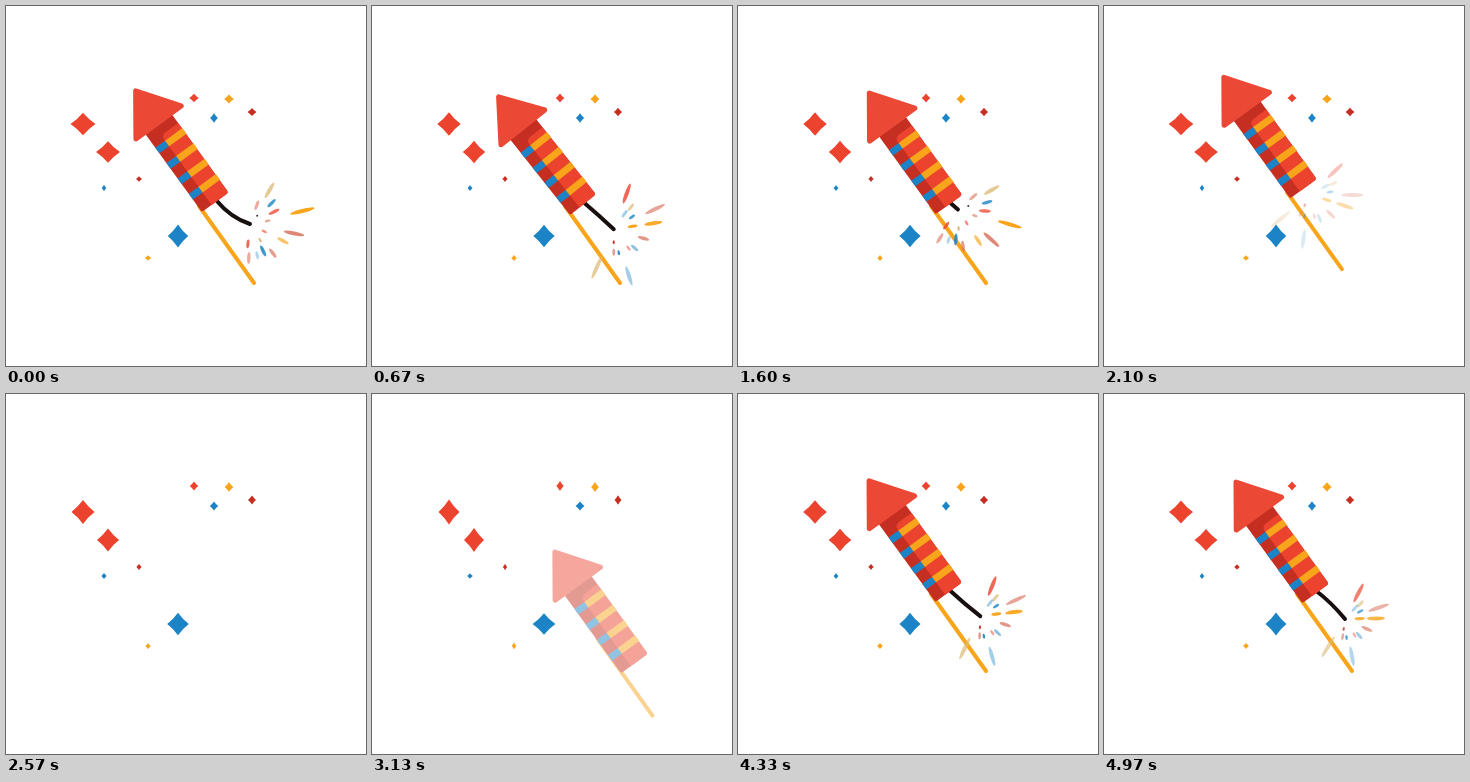
Animation of 360 by 360 pixels, one loop 5070 ms. Source, as an HTML page with a canvas:

```html
<!DOCTYPE html>
<html lang="en">
<head>
<meta charset="utf-8">
<title>Firework rocket</title>
<style>
html, body { margin: 0; width: 100%; height: 100%; overflow: hidden; background: #fff; }
canvas { display: block; width: 100vw; height: 100vh; }
</style>
</head>
<body>
<canvas id="stage" width="360" height="360"></canvas>
<script>
const LOOP = 5070, SIZE = 360;
const stage = document.getElementById('stage').getContext('2d');
const layer = document.createElement('canvas');
layer.width = layer.height = SIZE;
const ctx = layer.getContext('2d');

const RED = '#ec432e', DARK = '#c52f22', ORANGE = '#f8a51c', BLUE = '#1c84c6';
const TAN = '#dcb873', SALMON = '#d8745f', INK = '#17100f';
const rad = deg => deg * Math.PI / 180;
const clamp = v => Math.max(0, Math.min(1, v));
const LEAN = rad(-36);
const UP = { x: Math.sin(LEAN), y: -Math.cos(LEAN) };

// Linear interpolation through [time, value] keys.
function track(t, keys) {
  for (let i = 1; i < keys.length; i++) {
    const [t0, v0] = keys[i - 1], [t1, v1] = keys[i];
    if (t < t1) return v0 + (v1 - v0) * clamp((t - t0) / (t1 - t0));
  }
  return keys[keys.length - 1][1];
}

const SWAY = [[0, 0], [100, 0], [570, .6], [670, .75], [1100, .6], [1600, .7], [1900, .5], [2100, .1],
  [2400, 0], [4050, 0], [4500, .95], [4970, 1]];
const TILT = [[0, 0], [300, -.3], [670, -2.5], [1100, -1.5], [1600, 0], [3370, 0], [3700, -.7], [4200, 0]];
const SOLID = [[0, 1], [2150, 1], [2270, .45], [2330, 0], [3060, 0], [3130, .48], [3260, 1]];
const FUSE = [[0, 1], [1100, 1], [1810, 0], [3200, 0], [3370, 1]];
const GLOW = [[0, 1], [1750, 1], [2100, .4], [2330, 0], [3270, 0], [3400, 1]];
const SPIN = [[0, 0], [1600, 30], [2100, 39], [2700, 50], [2900, 0], [3700, 8.6], [4970, 20]];
const SQUASH = [[0, 1], [670, .2], [1600, .2], [2100, .9], [3130, -1], [3700, .2], [4970, .5], [5070, 1]];

// x, y, radius, colour
const gems = [
  [77, 118, 11.5, RED], [102, 146, 11, RED], [172, 230, 10.8, BLUE],
  [188, 92, 4.2, RED], [223, 93, 4.4, ORANGE], [208, 112, 4.2, BLUE], [246, 106, 4, DARK],
  [98, 182, 2.6, BLUE], [133, 173, 2.6, DARK], [142, 252, 2.7, ORANGE]
];

// angle, distance, length, colour, opacity
const wideBurst = [
  [-60, 39, 18, TAN, .75], [-44, 30, 11, BLUE, .8], [-70, 20, 10, SALMON, .6],
  [-27, 27, 12, RED, .75], [-14, 54, 25, ORANGE, 1], [-10, 18, 6, SALMON, .6],
  [27, 16, 6, RED, .6], [12, 45, 21, SALMON, .85], [27, 37, 13, ORANGE, .65],
  [52, 37, 11, SALMON, .7], [64, 30, 12, BLUE, .85], [77, 32, 8, BLUE, .35],
  [92, 34, 12, SALMON, .6], [96, 20, 9, RED, .8], [58, 19, 5, TAN, .9], [-49, 11, 2, INK, .9]
];
const longBurst = [
  [-70, 38, 21, RED, .8], [-26, 46, 22, SALMON, .65], [-8.5, 40, 18, ORANGE, .95],
  [114, 42, 24, TAN, .7], [72, 49, 20, BLUE, .4], [-9, 19, 10, ORANGE, 1],
  [-52, 28, 9, TAN, .7], [-55, 19, 9, BLUE, .4], [-34, 22, 7, BLUE, .8],
  [17, 31, 12, SALMON, .75], [42, 28, 9, BLUE, .5], [52, 24, 6, RED, .5],
  [78, 24, 5, BLUE, .9], [90, 23, 7, SALMON, .7], [90, 13, 4, DARK, .9]
];

function drawGem([x, y, r, color], squash) {
  const big = r > 6 ? 1 : .5;
  const dir = color === BLUE ? -.6 : 1;
  const w = r + squash * big * dir, h = r + .4 - .6 * squash * big * dir;
  const bend = .43;
  stage.fillStyle = color;
  stage.beginPath();
  stage.moveTo(x, y - h);
  for (const [cx, cy, ex, ey] of [[1, -1, 1, 0], [1, 1, 0, 1], [-1, 1, -1, 0], [-1, -1, 0, -1]])
    stage.quadraticCurveTo(x + cx * w * bend, y + cy * h * bend, x + ex * w, y + ey * h);
  stage.fill();
}

function line(color, width, x0, y0, x1, y1) {
  ctx.strokeStyle = color;
  ctx.lineWidth = width;
  ctx.beginPath();
  ctx.moveTo(x0, y0);
  ctx.lineTo(x1, y1);
  ctx.stroke();
}

function box(color, x, y, w, h, radii = 0) {
  ctx.fillStyle = color;
  ctx.beginPath();
  ctx.roundRect(x, y, w, h, radii);
  ctx.fill();
}

function fuseShape(sway) {
  return [[210 + sway, 194 + 2 * sway], [225 + 2 * sway, 212 - 4 * sway], [244 - 3 * sway, 218 + 7 * sway]];
}

const mix = (a, b, k) => [a[0] + (b[0] - a[0]) * k, a[1] + (b[1] - a[1]) * k];

// Leading part of the fuse curve, cut at k.
function cutFuse(sway, k) {
  const [a, b, c] = fuseShape(sway);
  const ab = mix(a, b, k);
  return [a, ab, mix(ab, mix(b, c, k), k)];
}

function drawFuse([a, b, c]) {
  ctx.strokeStyle = INK;
  ctx.lineWidth = 4;
  ctx.beginPath();
  ctx.moveTo(...a);
  ctx.quadraticCurveTo(...b, ...c);
  ctx.stroke();
}

function drawBody(sway, tilt) {
  ctx.translate(196 - UP.x * 4 * sway, 206 - UP.y * 4 * sway);
  ctx.rotate(LEAN);
  ctx.translate(16, 0);
  ctx.rotate(rad(tilt));
  ctx.translate(-16, 0);

  box(DARK, 0, -98, 33, 98, [0, 0, 3, 2]);
  box(RED, 12, -86, 21, 86, [5, 0, 3, 0]);
  for (let i = 0; i < 4; i++) {
    const y = -22.5 - i * 19;
    box(BLUE, 0, y, 12, 7);
    box(ORANGE, 12, y, 21.5, 7);
  }

  ctx.fillStyle = ctx.strokeStyle = '#eb4936';
  ctx.lineWidth = 5;
  ctx.beginPath();
  ctx.moveTo(-10.5, -98);
  ctx.lineTo(45.5, -98);
  ctx.lineTo(17.5, -137);
  ctx.closePath();
  ctx.fill();
  ctx.stroke();
}

// Distance travelled along the rocket's axis.
function flight(t) {
  if (t < 1900) return 0;
  if (t < 2700) return 58 * ((t - 1900) / 370) ** 2;
  return -91 * (1 - clamp((t - 3130) / 400)) ** 2;
}

function drawRocket(t, sway, travel, fuse) {
  const alpha = track(t, SOLID);
  if (!alpha) return;
  ctx.setTransform(1, 0, 0, 1, 0, 0);
  ctx.clearRect(0, 0, SIZE, SIZE);
  ctx.lineCap = ctx.lineJoin = 'round';

  const slide = travel < 0 ? travel * .61 : travel;
  ctx.translate(UP.x * slide, UP.y * slide);
  line(ORANGE, 4, 193, 200, 248, 277);

  ctx.setTransform(1, 0, 0, 1, UP.x * travel, UP.y * travel);
  if (track(t, FUSE) > 0) drawFuse(fuse);
  drawBody(sway, track(t, TILT));

  stage.globalAlpha = alpha;
  stage.drawImage(layer, 0, 0);
  stage.globalAlpha = 1;
}

function drawBurst(sparks, x, y, turn, scale, alpha) {
  for (const [angle, dist, length, color, opacity] of sparks) {
    const a = rad(angle + turn), r = dist * scale;
    stage.globalAlpha = opacity * alpha;
    stage.fillStyle = color;
    stage.beginPath();
    stage.ellipse(x + Math.cos(a) * r, y + Math.sin(a) * r,
      length / 2, Math.min(2, .8 + length * .08), a, 0, Math.PI * 2);
    stage.fill();
  }
  stage.globalAlpha = 1;
}

function drawSparks(t, travel, [x, y]) {
  const glow = track(t, GLOW);
  if (!glow) return;
  const cycle = 800;
  const phase = ((t < 2900 ? t : t - 3155) + cycle) % cycle;
  const spin = track(t, SPIN);
  x += UP.x * travel * .4;
  y += UP.y * travel * .4;

  const wide = ((phase + 40) % cycle) / 250;
  if (wide < 1)
    drawBurst(wideBurst, x, y, spin, .98 + .12 * wide,
      glow * clamp(wide * 6 + .1) * clamp((1 - wide) * 3));

  const long = (phase - 190) / 600;
  if (long > 0 && long < 1)
    drawBurst(longBurst, x, y, spin - 12.6, .76 + .3 * long,
      glow * clamp(long * 8 + .5) * clamp((1 - long) * 6));
}

function draw(t) {
  stage.fillStyle = '#fff';
  stage.fillRect(0, 0, SIZE, SIZE);
  const squash = track(t, SQUASH);
  for (const gem of gems) drawGem(gem, squash);

  const sway = track(t, SWAY), travel = flight(t);
  const fuse = cutFuse(sway, track(t, FUSE));
  drawRocket(t, sway, travel, fuse);
  drawSparks(t, travel, fuse[2]);
}

const start = performance.now();
function tick() {
  draw((performance.now() - start) % LOOP);
  requestAnimationFrame(tick);
}
tick();
</script>
</body>
</html>
```
